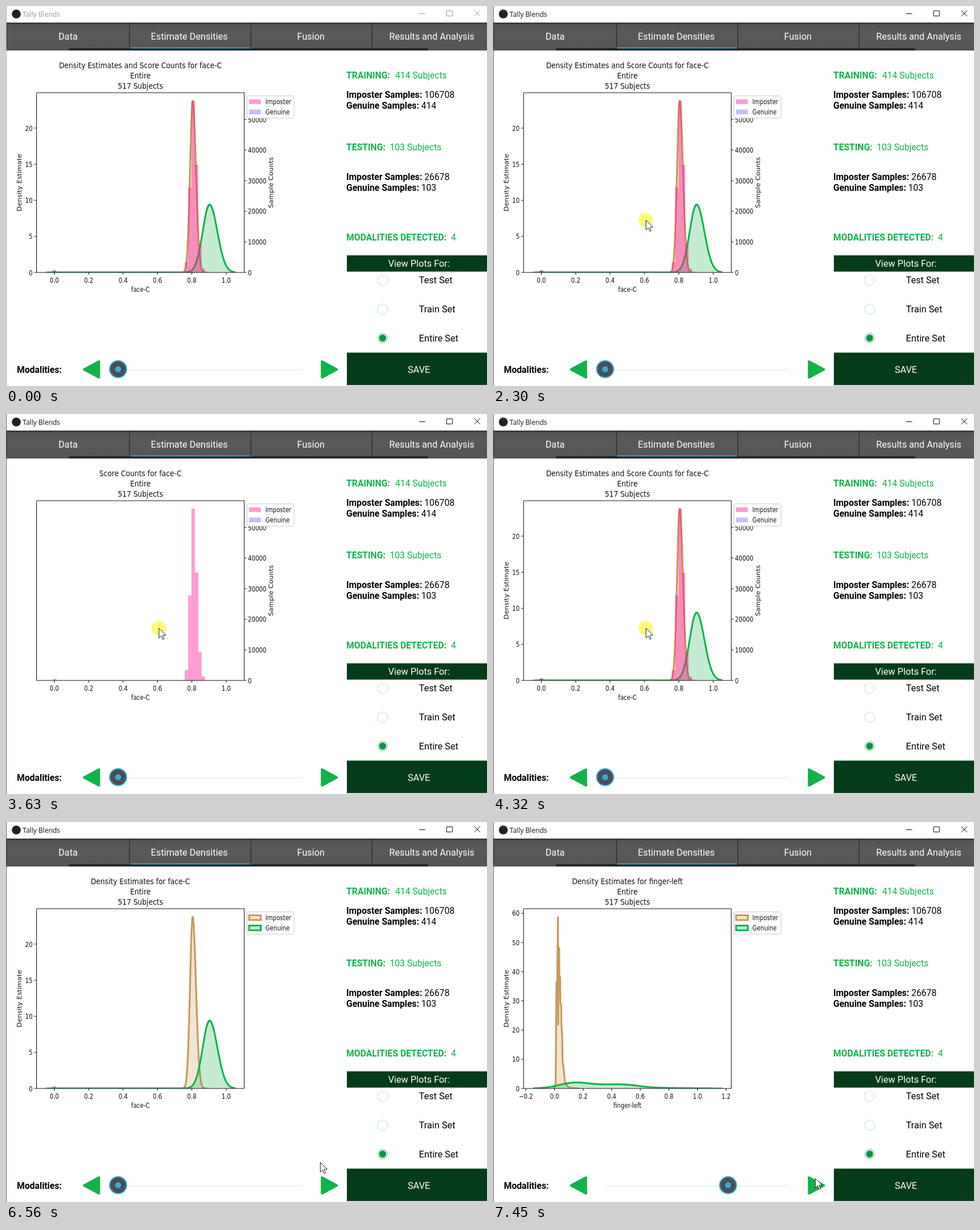
Animation, 841 px wide and 666 px high, one loop 8000 ms. Source, as an HTML page with a canvas:

```html
<!DOCTYPE html>
<html lang="en">
<head>
<meta charset="utf-8">
<title>Density plots</title>
<style>
html, body { margin: 0; width: 100%; height: 100%; overflow: hidden; background: #fff; }
canvas { display: block; }
</style>
</head>
<body>
<canvas id="stage" width="841" height="666"></canvas>
<script>
const ctx = document.getElementById('stage').getContext('2d');
const LOOP = 8000;
const GREEN = '#12b24b', DARK = '#043c1a', TAN = '#c89858', BLUE = '#36a9d6';
const AX = { left: 53.5, right: 416.5, top: 152, bottom: 467 };
const PLOT_SCALE = [0.731, 0.852];   // the figure is shown squeezed

// ---- basic drawing ----
function rect(x, y, w, h, fill) {
  ctx.fillStyle = fill;
  ctx.fillRect(x, y, w, h);
}
function line(x1, y1, x2, y2, color, width = 1) {
  ctx.strokeStyle = color;
  ctx.lineWidth = width;
  ctx.beginPath();
  ctx.moveTo(x1, y1);
  ctx.lineTo(x2, y2);
  ctx.stroke();
}
function circle(x, y, r, fill, stroke, width = 1) {
  ctx.beginPath();
  ctx.arc(x, y, r, 0, 7);
  if (fill) { ctx.fillStyle = fill; ctx.fill(); }
  if (stroke) { ctx.strokeStyle = stroke; ctx.lineWidth = width; ctx.stroke(); }
}
function polygon(points, fill, stroke, width) {
  ctx.beginPath();
  points.forEach(([x, y]) => ctx.lineTo(x, y));
  ctx.closePath();
  ctx.lineJoin = 'round';
  ctx.fillStyle = fill;
  ctx.fill();
  ctx.strokeStyle = stroke;
  ctx.lineWidth = width;
  ctx.stroke();
}
function text(str, x, y, color, font, align = 'left') {
  ctx.font = font;
  ctx.fillStyle = color;
  ctx.textAlign = align;
  ctx.fillText(str, x, y);
}
const LABEL = '16.2px Roboto, sans-serif';
const BODY = '15.65px Roboto, sans-serif';
const BOLD = 'bold ' + BODY;

function plotText(str, x, y, align = 'center', size = 13.89, turn = 0) {
  ctx.save();
  ctx.translate(x, y);
  ctx.scale(...PLOT_SCALE);
  ctx.rotate(turn);
  text(str, 0, 0, '#111', size + 'px "DejaVu Sans", sans-serif', align);
  ctx.restore();
}

// ---- plot data, in stage pixels ----
// bump: centre, height, left and right spread
const bumps = list => x => list.reduce((sum, [c, h, l, r = l]) =>
  sum + h * Math.exp(-(((x - c) / (x < c ? l : r)) ** 2) / 2), 0);

function sample(from, to, height) {
  const points = [];
  for (let x = from; x <= to; x += 0.5) points.push([x, AX.bottom - height(x)]);
  return points;
}

const face = {
  name: 'face-C', zero: 84.5, unit: 300.5, xTicks: [0, 0.2, 0.4, 0.6, 0.8, 1],
  yStep: 5, yCount: 5, yUnit: 12.65,
  imposter: sample(77, 352, bumps([[84.5, 2.5, 2], [326.4, 301, 4.6, 5.7]])),
  genuine: sample(70, 401, bumps([[356, 119, 12, 13.5]]))
};
const finger = {
  name: 'finger-left', zero: 107.5, unit: 250, xTicks: [-0.2, 0, 0.2, 0.4, 0.6, 0.8, 1, 1.2],
  yStep: 10, yCount: 7, yUnit: 5.117,
  imposter: [[106, 467], [109.5, 460], [111, 280], [112.3, 278], [113.5, 167], [114, 355],
    [114.8, 220], [115.8, 222], [116, 270], [117.3, 272], [118, 318], [119.3, 321],
    [119.5, 350], [121, 378], [121.6, 418], [124, 436], [125.5, 454], [129, 462],
    [135, 466], [150, 467]],
  genuine: sample(70, 401, bumps([[140, 9, 26], [188, 4.5, 30], [232, 5, 26], [290, 1, 40]]))
};
const barHeights = [18, 149, 301, 189, 50, 7];

// ---- plot ----
function density(points, color) {
  ctx.beginPath();
  points.forEach(([x, y]) => ctx.lineTo(x, y));
  ctx.globalAlpha = 0.25;
  ctx.fillStyle = color;
  ctx.fill();
  ctx.globalAlpha = 1;
  ctx.strokeStyle = color;
  ctx.lineWidth = 3.1;
  ctx.lineJoin = 'round';
  ctx.stroke();
}

function swatch(y, color, alpha, outlined) {
  ctx.globalAlpha = alpha;
  rect(425, y, 20.5, 8.3, color);
  ctx.globalAlpha = 1;
  if (outlined) {
    ctx.strokeStyle = color;
    ctx.lineWidth = 3;
    ctx.lineJoin = 'miter';
    ctx.strokeRect(425, y, 20.5, 8.3);
  }
}

function drawPlot(data, mode) {
  const showDensity = mode !== 'counts', showCounts = mode !== 'density';
  const midX = (AX.left + AX.right) / 2, midY = (AX.top + AX.bottom) / 2;

  ctx.save();
  ctx.beginPath();
  ctx.rect(AX.left, AX.top, AX.right - AX.left, AX.bottom - AX.top);
  ctx.clip();
  if (showDensity) {
    density(data.imposter, TAN);
    density(data.genuine, GREEN);
  }
  if (showCounts) {
    ctx.globalAlpha = 0.42;
    barHeights.forEach((h, i) => rect(312.5 + i * 5.9, AX.bottom - h, 5.9, h, '#ff1493'));
    rect(82, AX.bottom - 3, 5.9, 3, '#ff1493');
  }
  ctx.restore();

  ctx.strokeStyle = '#111';
  ctx.lineWidth = 1;
  ctx.strokeRect(AX.left, AX.top, AX.right - AX.left, AX.bottom - AX.top);

  for (const v of data.xTicks) {
    const x = data.zero + v * data.unit;
    line(x, AX.bottom, x, AX.bottom + 4, '#111');
    plotText(v.toFixed(1).replace('-', '\u2212'), x, 484.5);
  }
  if (showDensity) {
    for (let i = 0; i < data.yCount; i++) {
      const y = AX.bottom - i * data.yStep * data.yUnit;
      line(AX.left - 4, y, AX.left, y, '#111');
      plotText(i * data.yStep, 46.5, y + 4.5, 'right');
    }
    plotText('Density Estimate', 27, midY, 'center', 13.89, -Math.PI / 2);
  }
  if (showCounts) {
    for (let i = 0; i < 6; i++) {
      const y = AX.bottom - i * 53.6;
      line(AX.right, y, AX.right + 4, y, '#111');
      plotText(i * 10000, 423, y + 4.5, 'left');
    }
    plotText('Sample Counts', 467, midY, 'center', 13.89, -Math.PI / 2);
  }

  const kind = { both: 'Density Estimates and Score Counts', density: 'Density Estimates', counts: 'Score Counts' }[mode];
  [`${kind} for ${data.name}`, 'Entire', '517 Subjects']
    .forEach((row, i) => plotText(row, midX, 109 + i * 18, 'center', 16.67));
  plotText(data.name, midX, 501);

  ctx.beginPath();
  ctx.roundRect(421.5, 157.5, 82, 39, 2);
  ctx.fillStyle = 'rgba(255,255,255,.9)';
  ctx.fill();
  ctx.strokeStyle = '#ccc';
  ctx.lineWidth = 1;
  ctx.stroke();
  if (showCounts) {
    swatch(163.5, '#ff1493', 0.42);
    swatch(181.5, '#7b68ee', 0.42);
  } else {
    swatch(163.5, TAN, 0.25, true);
    swatch(181.5, GREEN, 0.25, true);
  }
  plotText('Imposter', 453.6, 172, 'left');
  plotText('Genuine', 453.6, 190, 'left');
}

// ---- window ----
function drawTitleBar(focused) {
  const ink = focused ? '#111' : '#999';
  circle(18, 14, 7.8, '#222');
  text('Tally Blends', 29, 19, ink, '12px "Open Sans", sans-serif');
  line(722, 13.5, 733, 13.5, ink);
  ctx.strokeRect(770.5, 8.5, 10, 9);
  line(819, 8, 829, 18, ink);
  line(819, 18, 829, 8, ink);
  line(0.5, 0, 0.5, 666, focused ? '#555' : '#aaa');
}

function drawTabs() {
  rect(1, 29, 840, 49, '#3a3a3a');
  rect(1, 74, 840, 4, '#555');
  rect(110, 74, 628, 4, '#262626');
  [['Data', 2, 108.5], ['Estimate Densities', 217, 320.5], ['Fusion', 429, 533], ['Results and Analysis', 641, 744.5]]
    .forEach(([name, x, center], i) => {
      const shade = ctx.createLinearGradient(0, 31, 0, 74);
      shade.addColorStop(0, '#505050');
      shade.addColorStop(0.3, '#5a5a5a');
      shade.addColorStop(1, '#555');
      rect(x, 31.5, i ? 210 : 213, 42.5, shade);
      text(name, center, 58.5, '#fff', LABEL, 'center');
    });
  rect(217, 72.5, 210, 1.8, BLUE);
}

function pair(label, value, valueX, y, color) {
  text(label, 595, y, color, BOLD);
  text(value, valueX, y, color, BODY);
}

function drawSidebar() {
  pair('TRAINING:', '414 Subjects', 680.5, 127, GREEN);
  pair('Imposter Samples:', '106708', 731.5, 161, '#000');
  pair('Genuine Samples:', '414', 726, 180, '#000');
  pair('TESTING:', '103 Subjects', 671, 253, GREEN);
  pair('Imposter Samples:', '26678', 731.5, 305, '#000');
  pair('Genuine Samples:', '103', 726, 324, '#000');
  pair('MODALITIES DETECTED:', '4', 778, 411, GREEN);

  rect(596, 437, 245, 28.5, DARK);
  text('View Plots For:', 722, 457, '#fff', LABEL, 'center');
  ['Test Set', 'Train Set', 'Entire Set'].forEach((name, i) => {
    const y = 480.5 + i * 50.8;
    if (i < 2) circle(658.5, y, 9, '#fff', '#c8e6df', 1.2);
    else {
      circle(658.5, y, 9.5, '#bfe3cf');
      circle(658.5, y, 6, '#12904a');
    }
    text(name, 722, y + 5.5, '#000', LABEL);
  });
  rect(596, 607.5, 245, 57, DARK);
  text('SAVE', 722, 643, '#fff', LABEL, 'center');
}

function drawSlider(x) {
  text('Modalities:', 19, 642.5, '#000', BOLD);
  polygon([[136.5, 637], [162.5, 623], [162.5, 651]], GREEN, GREEN, 4);
  polygon([[552.5, 623], [552.5, 651], [578.5, 637]], GREEN, GREEN, 4);
  line(196, 637.5, 518, 637.5, '#e2f5f5', 2);
  circle(x, 636.5, 14.7, '#4a5057', BLUE, 2);
  circle(x, 636.5, 5.2, BLUE);
}

// ---- pointer ----
// start, ms per step, steps, target x, target y, ease-out power
const moves = [
  [365, 70, 2, 471, 542, 1.2],
  [698, 65.5, 8, 267, 375, 1.7],
  [5908, 63, 4, 516, 527, 1.4],
  [6355, 67, 10, 563, 624, 2.42]
];
const clicks = [[2300, 2450], [2770, 3030], [3630, 3770], [4320, 4650], [5370, 5570], [7240, 7450]];

function pointerAt(t) {
  let x = 547, y = 622;
  for (const [start, step, count, toX, toY, power] of moves) {
    const done = Math.min(count, Math.max(0, Math.floor((t - start) / step) + 1));
    const k = 1 - (1 - done / count) ** power;
    x += (toX - x) * k;
    y += (toY - y) * k;
  }
  return [Math.round(x), Math.round(y)];
}

function drawPointer(t) {
  if (t < 300) return;
  const [x, y] = pointerAt(t);
  if (clicks.some(([on, off]) => t >= on && t < off)) circle(x, y, 12.8, 'rgba(255,250,110,.9)');
  const shape = [[0, 0], [0, 17], [4, 13.3], [6.7, 19.5], [9.2, 18.4], [6.6, 12.4], [12, 12]];
  polygon(shape.map(([dx, dy]) => [x + 0.5 + dx, y + 0.5 + dy]), '#fff', '#222', 1);
}

function modeAt(t) {
  if (t < 2770) return 'both';
  if (t < 3630) return 'density';
  if (t < 4320) return 'counts';
  return t < 5370 ? 'both' : 'density';
}

function draw(t) {
  const moved = t >= 7345;
  rect(0, 0, 841, 666, '#fff');
  drawTabs();
  drawTitleBar(t >= 2300);
  drawSidebar();
  drawSlider(moved ? 411 : 196);
  drawPlot(moved ? finger : face, modeAt(t));
  drawPointer(t);
}

const begin = performance.now();
function tick() {
  draw((performance.now() - begin) % LOOP);
  requestAnimationFrame(tick);
}
tick();
</script>
</body>
</html>
```
